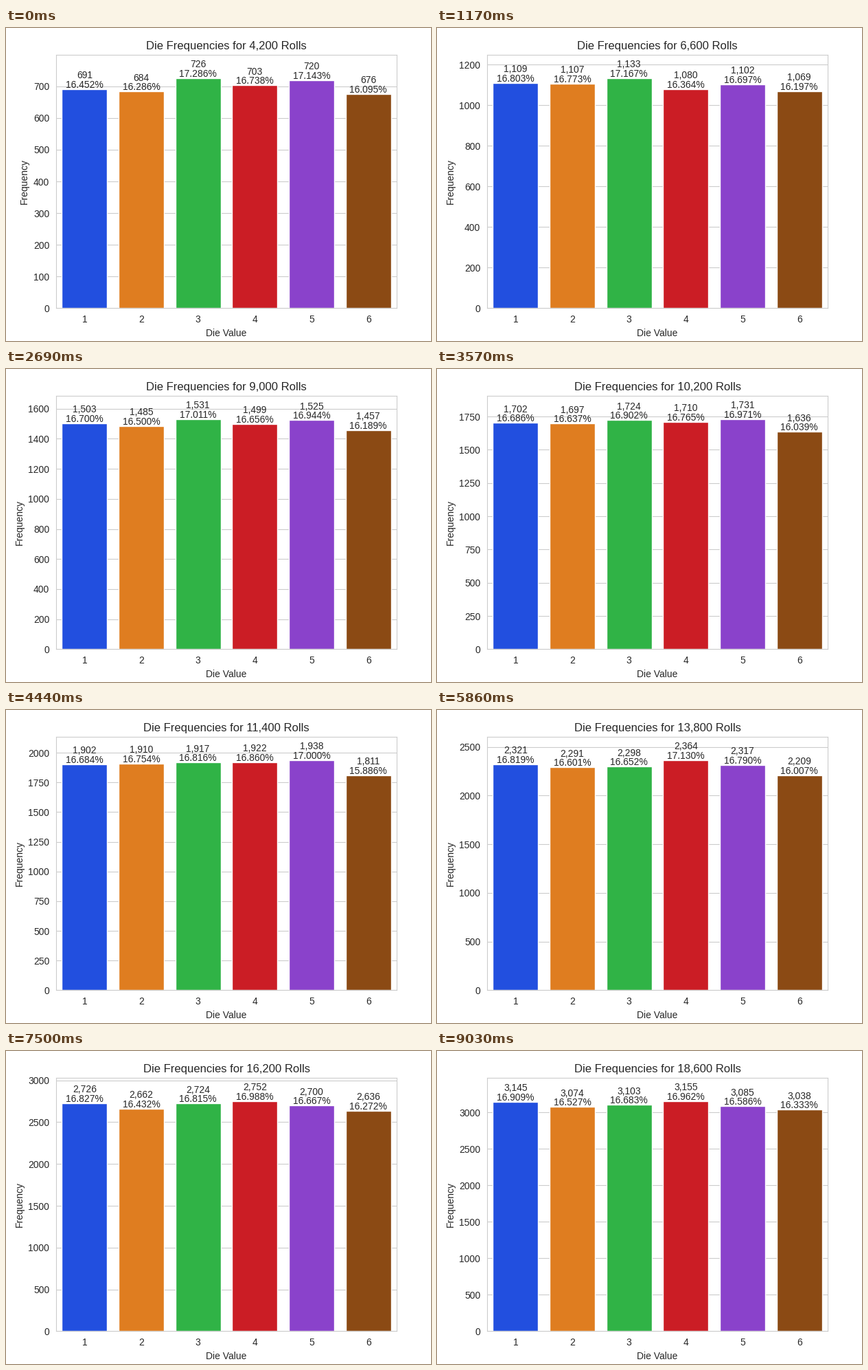
Animation, 619 px wide and 455 px high, one loop 9.13 s. Source, as a matplotlib script:

```python
import colorsys

import matplotlib.pyplot as plt
import numpy as np
from matplotlib.animation import FuncAnimation
from matplotlib.transforms import offset_copy

W, H, DPI = 619, 455, 100
LOOP, STEP = 9130, 55
CHANGES = [400, 1170, 1920, 2690, 3570, 4440,
           5090, 5860, 6630, 7500, 8260, 9030]
START_ROLLS, ROLLS_PER_STEP = 4200, 1200

# Face counts after every second batch of rolls
COUNTS = [
    [691, 684, 726, 703, 720, 676],
    [1109, 1107, 1133, 1080, 1102, 1069],
    [1503, 1485, 1531, 1499, 1525, 1457],
    [1902, 1910, 1917, 1922, 1938, 1811],
    [2321, 2291, 2298, 2364, 2317, 2209],
    [2726, 2662, 2724, 2752, 2700, 2636],
    [3145, 3074, 3103, 3155, 3085, 3038],
]
BRIGHT = ["#023eff", "#ff7c00", "#1ac938", "#e8000b", "#8b2be2", "#9f4800"]

plt.rcParams.update({
    "font.family": "Liberation Sans",
    "font.size": 10,
    "text.color": "0.15",
    "axes.labelcolor": "0.15",
    "xtick.color": "0.15",
    "ytick.color": "0.15",
    "axes.edgecolor": "0.8",
    "axes.axisbelow": True,
    "grid.color": "0.8",
    "grid.linewidth": 0.8,
})


def desaturate(color, amount=0.75):
    r, g, b = (int(color[i:i + 2], 16) / 255 for i in (1, 3, 5))
    h, l, s = colorsys.rgb_to_hls(r, g, b)
    return colorsys.hls_to_rgb(h, l, s * amount)


def counts_at(state):
    """Counts after a batch; odd batches lie halfway between known ones."""
    i, odd = divmod(state, 2)
    if not odd:
        return COUNTS[i]
    mid = [(a + b) // 2 for a, b in zip(COUNTS[i], COUNTS[i + 1])]
    mid[-1] = START_ROLLS + ROLLS_PER_STEP * state - sum(mid[:-1])
    return mid


fig = plt.figure(figsize=(W / DPI, H / DPI), dpi=DPI, facecolor="white")
ax = fig.add_axes([73 / W, 1 - 407.4 / H, 496 / W, 368 / H])
ax.set_xlim(-0.5, 5.5)
ax.set_xticks(range(6), [str(n) for n in range(1, 7)])
ax.tick_params(length=0, pad=7)
ax.grid(axis="y")
ax.set_xlabel("Die Value")
ax.set_ylabel("Frequency")
title = ax.set_title("", fontsize=12)

bars = ax.bar(range(6), COUNTS[0], width=0.8, edgecolor="white", linewidth=1,
              color=[desaturate(c) for c in BRIGHT])


def label_row(dy):
    shift = offset_copy(ax.transData, fig, y=dy, units="dots")
    return [ax.text(x, 0, "", ha="center", va="baseline", transform=shift)
            for x in range(6)]


count_labels = label_row(15.6)
share_labels = label_row(2)
change_frames = [t // STEP for t in CHANGES]


def update(frame):
    state = int(np.searchsorted(change_frames, frame, side="right"))
    counts = counts_at(state)
    total = sum(counts)
    title.set_text(f"Die Frequencies for {total:,} Rolls")
    ax.set_ylim(0, max(counts) * 1.1)
    for bar, top, share, n in zip(bars, count_labels, share_labels, counts):
        bar.set_height(n)
        top.set_y(n)
        top.set_text(f"{n:,}")
        share.set_y(n)
        share.set_text(f"{n / total:.3%}")
    return [title, *bars, *count_labels, *share_labels]


anim = FuncAnimation(fig, update, frames=LOOP // STEP, interval=STEP,
                     init_func=lambda: update(0), repeat=True,
                     repeat_delay=0, blit=False)
plt.show()
```
